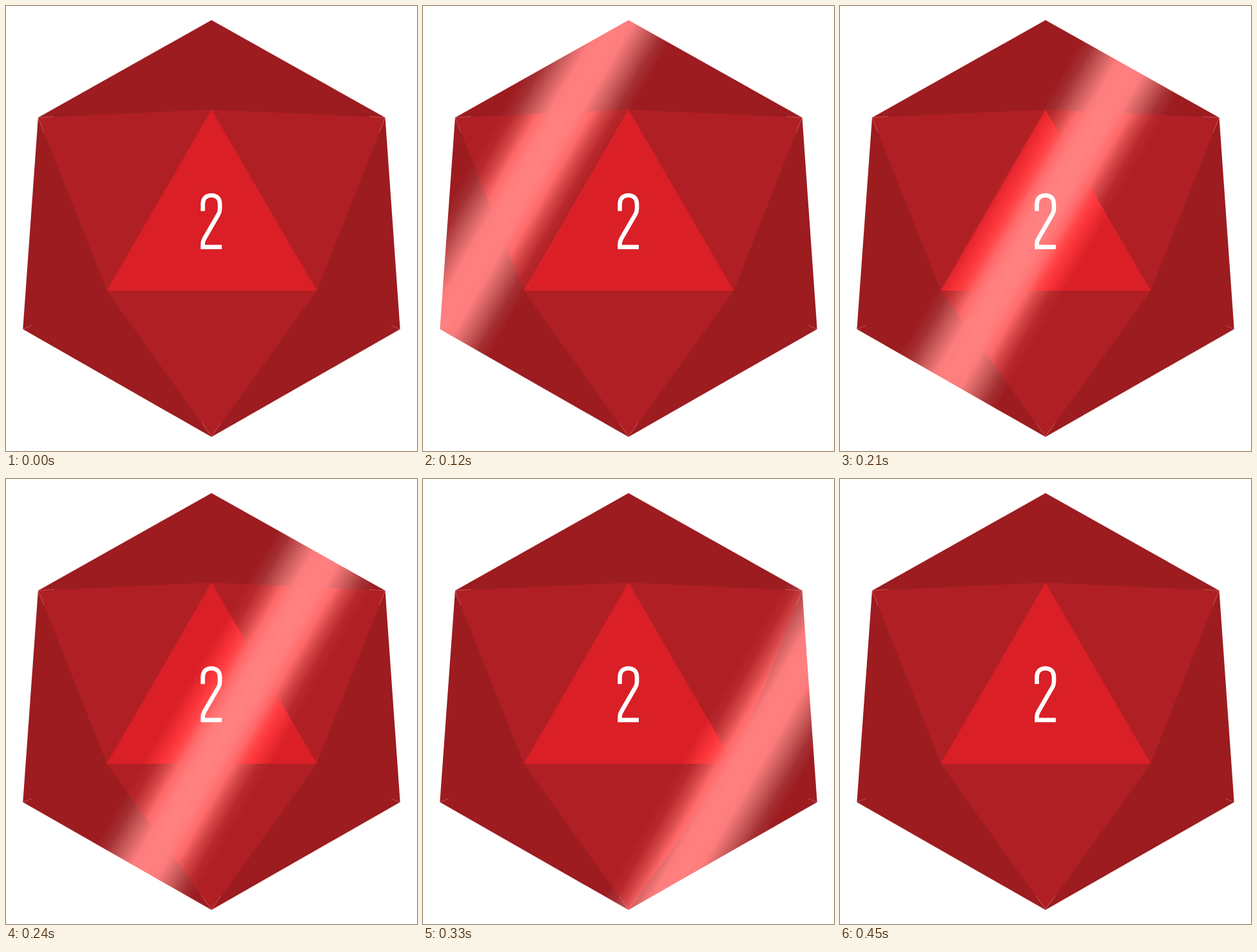
An HTML page for the animation above (4.5 s loop, 640 by 694 pixels).

```html
<!DOCTYPE html>
<html lang="en">
<head>
<meta charset="utf-8">
<title>Shiny die</title>
<style>
  html, body { margin: 0; width: 100%; height: 100%; overflow: hidden; background: #fff; }
  svg { display: block; width: 100%; height: 100%; }
</style>
</head>
<body>
<svg viewBox="0 0 640 694" role="img" aria-label="2">
  <defs id="defs"></defs>
  <path fill="url(#dark)" d="M320 22L590.5 174L613.7 504L320 672L26.3 504L50 174Z"/>
  <path fill="url(#mid)" d="M50 174L320 161.5L590.5 174L484 444L320 672L157 444Z"/>
  <path fill="url(#light)" d="M320 161.5L484 444H157Z"/>
  <!-- hairline seams at the corners -->
  <path fill="none" stroke="#e3a5a5" stroke-width=".7" stroke-opacity=".6"
    d="M50 174L75 172.3M50 174L59 197M590.5 174L565 172.3M590.5 174L581 197
       M26.3 504L40 498.5M613.7 504L600 498.5M320 671L305 650M320 671L335 650"/>
  <path fill="none" stroke="#fff" stroke-width="6.6"
    d="M306.5 319.7V309C306.5 300 311.5 295.2 319.8 295.2S333.1 300 333.1 309V316Q333.1 320.5 331 324.5
       L309 362.5Q306.5 367 306.5 371V375.9H336"/>
</svg>
<script>
const LOOP = 4500, STEP = 30, SWEEP_END = 450;
const HALF = 87;                      // half the width of the shine
const NX = Math.cos(Math.PI / 6), NY = 0.5;

// Colours of the shine by distance from its centre line
const shades = {
  dark: [[0, '#ff8080'], [22, '#fc7c7c'], [45, '#cb5c5c'], [68, '#a53033'], [HALF, '#9c1c20']],
  mid: [[0, '#ff8282'], [20, '#ff7c7c'], [36, '#ff6969'], [52, '#d64749'], [70, '#b8292d'], [HALF, '#af1f24']],
  light: [[0, '#ff8282'], [20, '#ff7c7c'], [36, '#ff6768'], [48, '#ff474a'], [60, '#fb363b'], [HALF, '#da1f26']]
};

const stop = (d, color) => `<stop offset="${0.5 + d / HALF / 2}" stop-color="${color}"/>`;
document.getElementById('defs').innerHTML = Object.entries(shades).map(([id, list]) => {
  const left = list.slice(1).reverse().map(([d, c]) => stop(-d, c));
  const right = list.map(([d, c]) => stop(d, c));
  return `<linearGradient id="${id}" gradientUnits="userSpaceOnUse"
    x1="${-HALF * NX}" y1="${-HALF * NY}" x2="${HALF * NX}" y2="${HALF * NY}">
    ${left.join('')}${right.join('')}</linearGradient>`;
}).join('');

const gradients = document.querySelectorAll('linearGradient');
const start = performance.now();

function draw() {
  const time = (performance.now() - start) % LOOP;
  const t = Math.floor(time / STEP) * STEP;
  const moving = t >= STEP && t < SWEEP_END;
  const pos = moving ? 275 + 1.815 * (t - 120) : -500;
  for (const g of gradients) {
    g.setAttribute('gradientTransform', `translate(${pos * NX} ${pos * NY})`);
  }
  requestAnimationFrame(draw);
}
draw();
</script>
</body>
</html>
```
